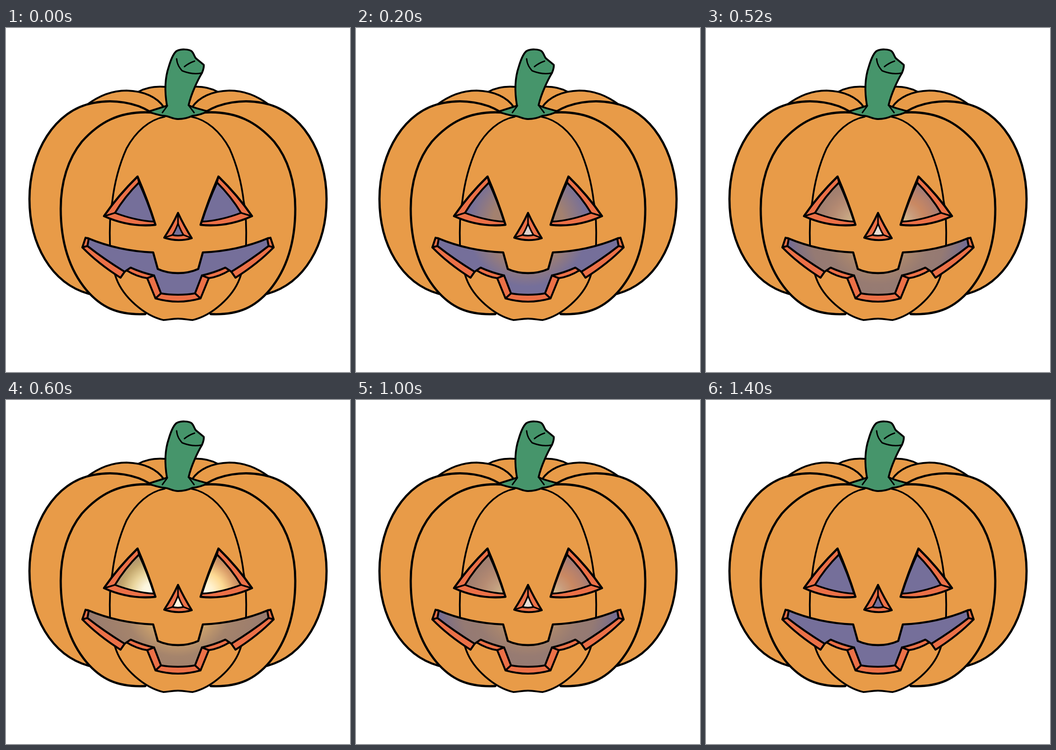
An HTML page with a canvas that plays this animation: 748x748 px, repeating every 1.6 s.

```html
<!DOCTYPE html>
<html lang="en">
<head>
<meta charset="utf-8">
<title>Glowing pumpkin</title>
<style>
html, body { margin: 0; width: 100%; height: 100%; overflow: hidden; background: #fff; }
canvas { display: block; }
</style>
</head>
<body>
<canvas id="stage" width="748" height="748"></canvas>
<script>
const ctx = document.getElementById('stage').getContext('2d');
const ORANGE = '#e89b48', GREEN = '#46956b', RED = '#eb7047', PURPLE = '#756f9a';
const SIZE = 748, STEP = 200, LOOP = 1600;
const LEVELS = [0, 1, 2, 3, 3, 2, 1, 0];

// Left halves; each is mirrored about the vertical centre line.
// [line, extra outline that closes the fill, line width]
const LOBES = [
  ['M287 139 C303 130 322 126 347 128', 'L380 128 L380 185 L300 165 Z', 3.8],
  ['M176 167 C205 145 232 136 262 136 C300 137 328 150 343 172', 'L345 190 L313 185 Z', 4.2],
  ['M313 182 C283 163 235 154 190 163 C106 178 51 270 51 372 C51 470 98 555 180 578', 'L313 400 Z', 4.8],
  ['M322 184 C245 178 200 208 165 247 C135 284 119 335 119 393 C119 470 140 528 175 570 C205 605 240 625 303 622', 'L380 632 L380 184 Z', 4.8],
  ['M345 193 C312 199 282 225 262 262 C245 300 236 335 231 378 C226 400 225 440 226 470 C228 500 234 530 240 545 C255 585 300 625 342 635 C352 635 360 632 374 632', 'L380 632 L380 190 Z', 3.8]
];

const STEM = 'M309 182 C322 178 337 173 350 169 C345 140 345 110 354 84 C359 67 364 55 371 50 C381 45 396 46 403 50 C409 55 409 62 413 66 L430 80 C431 87 428 93 426 98 C417 113 403 142 397 168 C409 174 424 177 438 181 C428 187 415 190 405 191 C395 196 385 198 374 198 C363 198 355 192 345 191 C332 190 322 186 309 182 Z';
const CREASES = 'M371 67 C372 80 378 87 383 93 C395 98 410 101 425 98 M388 84 Q398 76 410 72 M351 169 L340 184 M397 168 L409 184';

const EYE_RIM = 'M286 323 Q244 364 213 409 Q268 434 325 428 Q308 374 286 323 Z';
const EYE_HOLE = 'M289 336 Q258 367 237 402 Q282 419 322 421 Q308 377 289 336 Z';
const EYE_SEAM = 'M237 402 L214 409 M286 323 L289 336';

const NOSE_RIM = 'M374 402 Q361 430 344 456 Q374 466 404 457 Q387 430 374 402 Z';
const NOSE_HOLE = 'M374 425 Q369 439 362 450 Q374 453 386 450 Q379 439 374 425 Z';
const NOSE_SEAM = 'M374 402 V425 M344 456 L362 450 M404 457 L386 450';

const LIP_TOP = 'M178 457 Q245 485 320 488 L330 524 Q350 533 374 533';
const MOUTH = LIP_TOP + ' H378 V581 Q350 581 337 577 L322 538 Q295 532 271 521 L258 530 Q214 505 177 474 Z';
const CHEEK = 'M173 456 L180 458 L177 474 Q214 503 258 530 L249 543 Q200 512 166 477 Z';
const LIP = 'M262 527 L271 521 Q295 532 322 538 L337 577 Q352 580 378 580 V595 Q350 595 325 588 L307 544 Q285 541 262 527 Z';
const LIP_LINES = 'M258 530 L271 521 Q295 532 322 538 L337 577 Q352 580 374 580 M374 595 Q350 595 325 588 L307 544 Q285 541 262 527 M322 538 L307 544 M337 577 L325 588 M177 474 L166 477';

// Glow colours per level, from the light outward.
const NOSE_GLOW = [PURPLE, '#ddd0cc', '#e6dbd3', '#fff4de'];
const EYE_GLOW = [
  null, null,
  [['#ceb48a', '#c19c7e', '#b48a72', '#a58170', '#9c7d70'],
   ['#d4bc8e', '#c99c7c', '#c98862', '#b5806c', '#937980']],
  [['#fffbee', '#fcf5dc', '#e9d49c', '#c3a76d', '#a58a72'],
   ['#fffbee', '#fff1cd', '#fdd992', '#dca06a', '#ac7a5c']]
];
const MOUTH_GLOW = [
  null, null,
  ['#b8966e', '#a6846e', '#977b72', '#957a73', '#847280', '#6a68a0'],
  ['#d8b06c', '#c0986c', '#a5846c', '#a0806c', '#9c7e6e', '#94786e']
];

function radial(x, y, inner, outer, colors) {
  const g = ctx.createRadialGradient(x, y, inner, x, y, outer);
  colors.forEach((c, i) => g.addColorStop(i / (colors.length - 1), c));
  return g;
}

function fill(d, color) {
  ctx.fillStyle = color;
  ctx.fill(new Path2D(d));
}

function line(d, width) {
  ctx.lineWidth = width;
  ctx.stroke(new Path2D(d));
}

function both(draw) {
  draw(0);
  ctx.save();
  ctx.translate(SIZE, 0);
  ctx.scale(-1, 1);
  draw(1);
  ctx.restore();
}

function drawBody() {
  for (const [d, close, width] of LOBES) {
    both(() => fill(d + close, ORANGE));
    both(() => line(d, width));
  }
  fill(STEM, GREEN);
  line(STEM, 4);
  line(CREASES, 3);
}

function drawFace(level) {
  const faint = radial(374, 430, 78, 132, ['#a3816f', PURPLE]);
  const base = level ? faint : PURPLE;
  const eyes = EYE_GLOW[level], mouth = MOUTH_GLOW[level];

  both(side => {
    fill(EYE_RIM, RED);
    fill(EYE_HOLE, eyes ? radial(322, 422, 4, 94, eyes[side]) : base);
    line(EYE_RIM, 4.6);
    line(EYE_HOLE, 4);
    line(EYE_SEAM, 3.4);
  });

  fill(NOSE_RIM, RED);
  fill(NOSE_HOLE, NOSE_GLOW[level]);
  line(NOSE_RIM, 4.2);
  line(NOSE_HOLE, 3.4);
  line(NOSE_SEAM, 3.4);

  const light = mouth ? radial(374, 440, 60, 205, mouth) : base;
  both(() => {
    fill(MOUTH, light);
    fill(CHEEK, RED);
    fill(LIP, RED);
  });
  both(() => {
    line(LIP_TOP, 4.6);
    line(CHEEK, 4.2);
    line(LIP_LINES, 4.2);
  });
}

function render(time) {
  ctx.fillStyle = '#fff';
  ctx.fillRect(0, 0, SIZE, SIZE);
  ctx.strokeStyle = '#000';
  ctx.lineCap = ctx.lineJoin = 'round';
  drawBody();
  drawFace(LEVELS[Math.floor((time % LOOP) / STEP)]);
}

const start = performance.now();
function tick() {
  render(performance.now() - start);
  requestAnimationFrame(tick);
}
tick();
</script>
</body>
</html>
```
